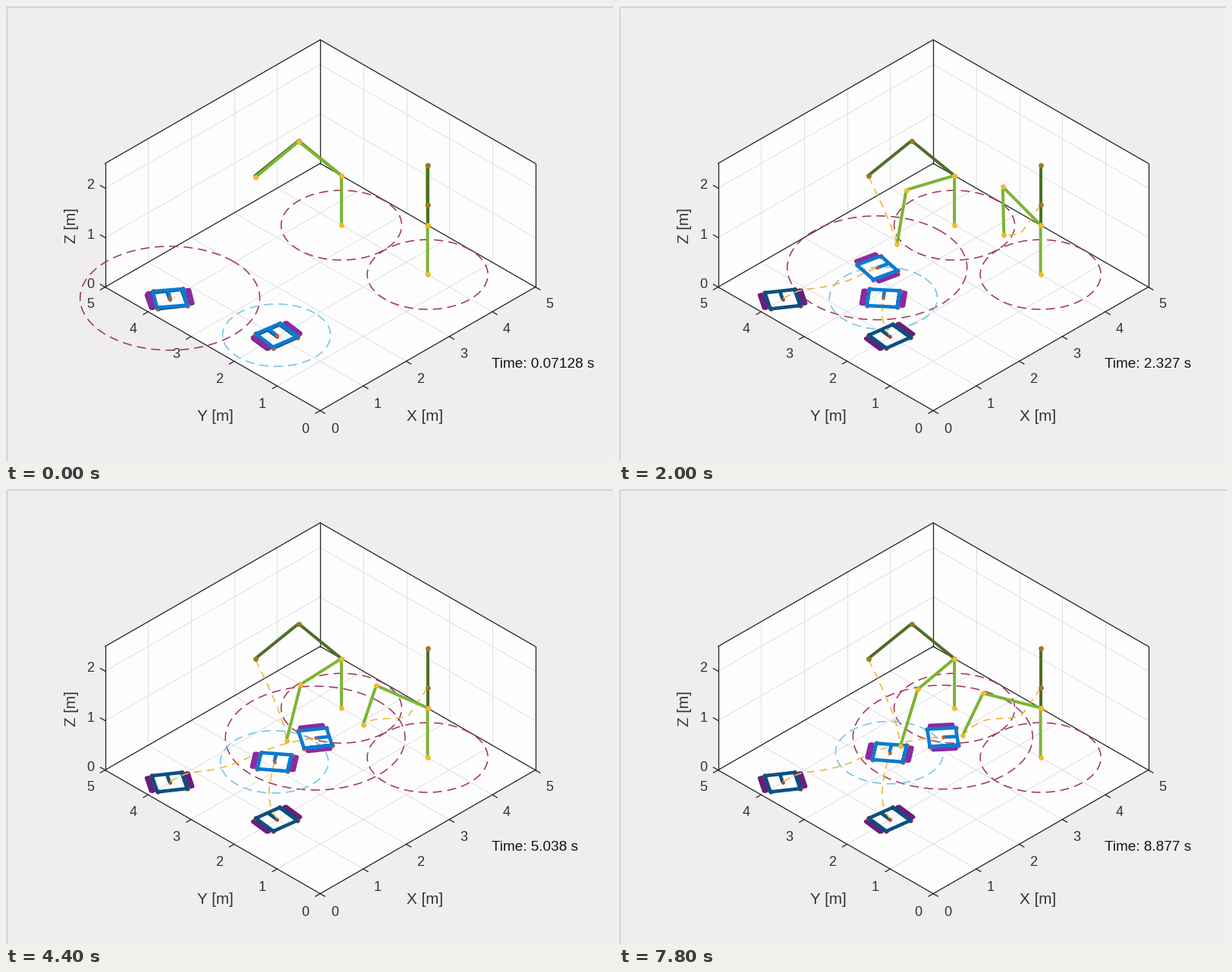
Recreate the animation shown at these times as a matplotlib script. Size 800 by 600 pixels, loop 8000 ms.

```python
import numpy as np
import matplotlib.pyplot as plt
from matplotlib.animation import FuncAnimation

W, H, DPI = 800, 600, 100
FRAMES, STEP_MS = 40, 200
PX = 72 / DPI                      # points per pixel
FONT = "Liberation Sans"
INK = "#262626"
LABEL = "#333333"

fig = plt.figure(figsize=(W / DPI, H / DPI), dpi=DPI, facecolor="#efedf0")
ax = fig.add_axes([0, 0, 1, 1])
ax.set_xlim(0.4, W + 0.4)
ax.set_ylim(H + 0.4, 0.4)
ax.axis("off")


# ---------- projection ----------
def project(x, y, z=0.0):
    x, y, z = np.asarray(x, float), np.asarray(y, float), np.asarray(z, float)
    return 414.5 + 56.7 * (x - y), 534 - 32.6 * (x + y) - 65.2 * z


# ---------- drawing helpers ----------
def line(x=(), y=(), color=INK, px=1.0, z=1, **kw):
    return ax.plot(x, y, color=color, lw=px * PX, zorder=z, **kw)[0]


def dashed(color, px, on, off, z):
    ln = line(color=color, px=px, z=z, dash_capstyle="butt")
    ln.set_dashes((on / px, off / px))
    return ln


def dots(color, size, z):
    return ax.plot([], [], "o", color=color, ms=size * PX, mew=0, zorder=z)[0]


def write(x, y, s, size, color=LABEL, ha="center", **kw):
    return ax.text(x, y, s, fontsize=size * PX, color=color, ha=ha,
                   va="baseline", family=FONT, zorder=20, **kw)


def segment(p, q, **kw):
    line(*project(*zip(p, q)), **kw)


# ---------- static box, grid, ticks, labels ----------
def draw_box():
    line([1, W, W, 1, 1], [1, 1, H, H, 1], "#c3c1c4", 1)
    hull = [(0, 0, 0), (5, 0, 0), (5, 0, 2.5), (5, 5, 2.5), (0, 5, 2.5), (0, 5, 0)]
    ax.fill(*project(*zip(*hull)), color="#fefdfe", lw=0, zorder=0)
    grid = dict(color="#dedde0", px=1, z=1)
    for k in range(1, 5):
        segment((k, 0, 0), (k, 5, 0), **grid)
        segment((0, k, 0), (5, k, 0), **grid)
        segment((k, 5, 0), (k, 5, 2.5), **grid)
        segment((5, k, 0), (5, k, 2.5), **grid)
    for k in (1, 2):
        segment((0, 5, k), (5, 5, k), **grid)
        segment((5, 0, k), (5, 5, k), **grid)
    edge = dict(color=INK, px=1.3, z=2)
    for z in (0, 2.5):
        segment((0, 5, z), (5, 5, z), **edge)
        segment((5, 0, z), (5, 5, z), **edge)
    segment((0, 0, 0), (5, 0, 0), **edge)
    segment((0, 0, 0), (0, 5, 0), **edge)
    for x, y in ((0, 5), (5, 5), (5, 0)):
        segment((x, y, 0), (x, y, 2.5), **edge)

    tick = 0.11
    for k in range(6):
        segment((k, 0, 0), (k, -tick, 0), **edge)
        segment((0, k, 0), (-tick, k, 0), **edge)
        write(433.6 + 56.6 * k, 563.5 - 33 * k, str(k), 18)
        write(394.6 - 56.6 * k, 563.5 - 33 * k, str(k), 18)
    for k in range(3):
        segment((0, 5, k), (0, 5 + tick, k), **edge)
        write(111.6, 372.5 - 65.4 * k, str(k), 18)
    write(552, 547, "X [m]", 20.7)
    write(276, 547, "Y [m]", 20.7)
    write(92.7, 290, "Z [m]", 20.7, rotation=90, rotation_mode="anchor")


RED, SKY, GOLD = "#a03a5c", "#72c3e8", "#ebb73c"
turn = np.linspace(0, 2 * np.pi, 121)


def ring(r, color):
    ln = dashed(color, 1.6, 12, 7, 3)

    def move(cx, cy):
        c, s = np.cos(turn), np.sin(turn)
        ln.set_data(cx + 56.2 * r * (c - s), cy - 32.5 * r * (c + s))
    return move


# ---------- robots ----------
def place(pts, pose):
    """Body coordinates (forward, left) in metres to stage pixels."""
    px, py, angle = pose
    f, l = np.array(pts, float).T
    c, s = np.cos(angle), np.sin(angle)
    x, y = f * c - l * s, f * s + l * c
    return px + 56.7 * (x - y), py - 32.6 * (x + y)


def rect(f, l0, l1):
    return [(-f, l0), (f, l0), (f, l1), (-f, l1), (-f, l0), (f, l0)]


BODY = rect(0.235, -0.25, 0.25)
WHEELS = [rect(0.19, side * 0.31, side * 0.35) for side in (1, -1)]


def car(blue, purple, orange, z):
    wheels = [line(color=purple, px=4.8, z=z, solid_joinstyle="round") for _ in WHEELS]
    corners = dots(orange, 6.5, z + 0.1)
    body = line(color=blue, px=4.6, z=z + 0.2, solid_joinstyle="round")
    mast = line(color=blue, px=4.6, z=z + 0.3, solid_capstyle="butt")
    hub = dots(orange, 4.8, z + 0.4)

    def move(pose):
        for ln, pts in zip(wheels, WHEELS):
            ln.set_data(*place(pts, pose))
        corners.set_data(*place(BODY[:4], pose))
        body.set_data(*place(BODY, pose))
        mast.set_data(*place([(0, 0), (0.235, 0)], pose))
        hub.set_data(*place([(0, 0)], pose))
    return move


def arm(green, yellow, z):
    links = line(color=green, px=4, z=z, solid_joinstyle="round")
    joints = dots(yellow, 6.8, z + 0.1)

    def move(*pts):
        x, y = zip(*pts)
        links.set_data(x, y)
        joints.set_data(x, y)
    return move


# ---------- motion rules, t counted in steps ----------
def settle(start, fast, slow, t):
    """Leave start by a fast and a slow shift, both dying out."""
    return start - fast * np.expm1(-t / 3) - slow * np.expm1(-t / 13)


def curve(points, x):
    """Smooth monotone curve y(x) through a few points."""
    k, v = np.array(sorted(points), float).T
    h = np.diff(k)
    d = np.diff(v) / h
    total = d[:-1] + d[1:]
    inner = 2 * d[:-1] * d[1:] / np.where(total == 0, 1, total)
    m = np.concatenate([d[:1], np.where(d[:-1] * d[1:] > 0, inner, 0), d[-1:]])
    i = np.clip(np.searchsorted(k, x, side="right") - 1, 0, len(h) - 1)
    u = (x - k[i]) / h[i]
    return ((1 + 2 * u) * (1 - u) ** 2 * v[i] + u * (1 - u) ** 2 * h[i] * m[i]
            + u * u * (3 - 2 * u) * v[i + 1] + u * u * (u - 1) * h[i] * m[i + 1])


ROUTE_A = [(216, 386), (240, 375.5), (270, 371), (298, 364),
           (337, 347), (372, 335.5), (412, 328.5), (430, 327.5)]
ROUTE_TIP_2 = [(556, 262.5), (540, 286), (527, 301), (487, 304.5), (466, 314), (452, 326.5)]


def car_a_at(t):
    x = 216.5 + 213 * np.tanh(t / 15)
    return x, curve(ROUTE_A, x)


def car_b_at(t):
    return settle(357, -20.5, 21.5, t), settle(434.5, 0, -91, t)


def elbow_1_at(t):
    return settle(386, -29, 39, t), settle(179, 39, 49, t)


def tip_1_at(t):
    return settle(329.5, 34.5, 7.5, t), settle(226, 61, 55.5, t)


def elbow_2_at(t):
    return settle(555.5, -17, -61.5, t), settle(210.5, -13, 76, t)


def tip_2_at(t):
    x = settle(555.5, 25, -134, t)
    return x, curve(ROUTE_TIP_2, x)


def pose_at(path, t, error):
    """Cars face along their path; the first heading error fades."""
    x, y = path(t)
    x2, y2 = path(t + 0.01)
    diff, total = (x2 - x) / 56.7, (y - y2) / 32.6
    return x, y, np.arctan2(total - diff, total + diff) + np.radians(error) * np.exp(-t)


draw_box()

BASE_1, BASE_2 = (442.5, 289.5), (556, 354.5)
SHOULDER_1, SHOULDER_2 = (442.5, 224), (556, 289)
for base in (BASE_1, BASE_2):
    ring(1.0, RED)(*base)

# starting poses stay visible in darker tones
DARK_CAR = ("#0b5080", "#671f7c", "#a04a24")
for x, y, deg in ((216, 387, 56), (357, 436, 83)):
    car(*DARK_CAR, 5)((x, y, np.radians(deg)))
DARK_ARM = ("#4d6f25", "#9c7a26")
arm(*DARK_ARM, 9)(SHOULDER_1, (386, 178), (329, 224))
arm(*DARK_ARM, 12)(SHOULDER_2, (556, 210), (556, 262))
dots("#f0bb2c", 6.8, 13).set_data(*zip(SHOULDER_2))

ring_a, ring_b = ring(1.49, RED), ring(0.895, SKY)
BRIGHT_CAR = ("#0a7bd2", "#8a2ba0", "#c8622c")
car_a, car_b = car(*BRIGHT_CAR, 7), car(*BRIGHT_CAR, 8)
BRIGHT_ARM = ("#7cb532", "#f0bb2c")
arm_1, arm_2 = arm(*BRIGHT_ARM, 10), arm(*BRIGHT_ARM, 11)
trails = [(dashed(GOLD, 1.6, 10, 7, 6), path)
          for path in (car_a_at, car_b_at, tip_1_at, tip_2_at)]
clock = write(640.8, 477.5, "", 19, "#141414", ha="left")


def seconds(i):
    return np.interp(i, [0, 6, 14, 22, 29, 34, 39],
                     [0.07128, 1.424, 3.23, 5.038, 6.616, 7.748, 8.877])


def draw(i):
    a, b = pose_at(car_a_at, i, 60), pose_at(car_b_at, i, 14)
    car_a(a)
    car_b(b)
    ring_a(*a[:2])
    ring_b(*b[:2])
    arm_1(BASE_1, SHOULDER_1, elbow_1_at(i), tip_1_at(i))
    arm_2(BASE_2, SHOULDER_2, elbow_2_at(i), tip_2_at(i))
    past = np.linspace(0, i, 5 * i + 2)
    for ln, path in trails:
        ln.set_data(*path(past))
    clock.set_text(f"Time: {seconds(i):.4g} s")
    return []


anim = FuncAnimation(fig, draw, frames=FRAMES, interval=STEP_MS,
                     init_func=lambda: draw(0), repeat=True, repeat_delay=0)
plt.show()
```
